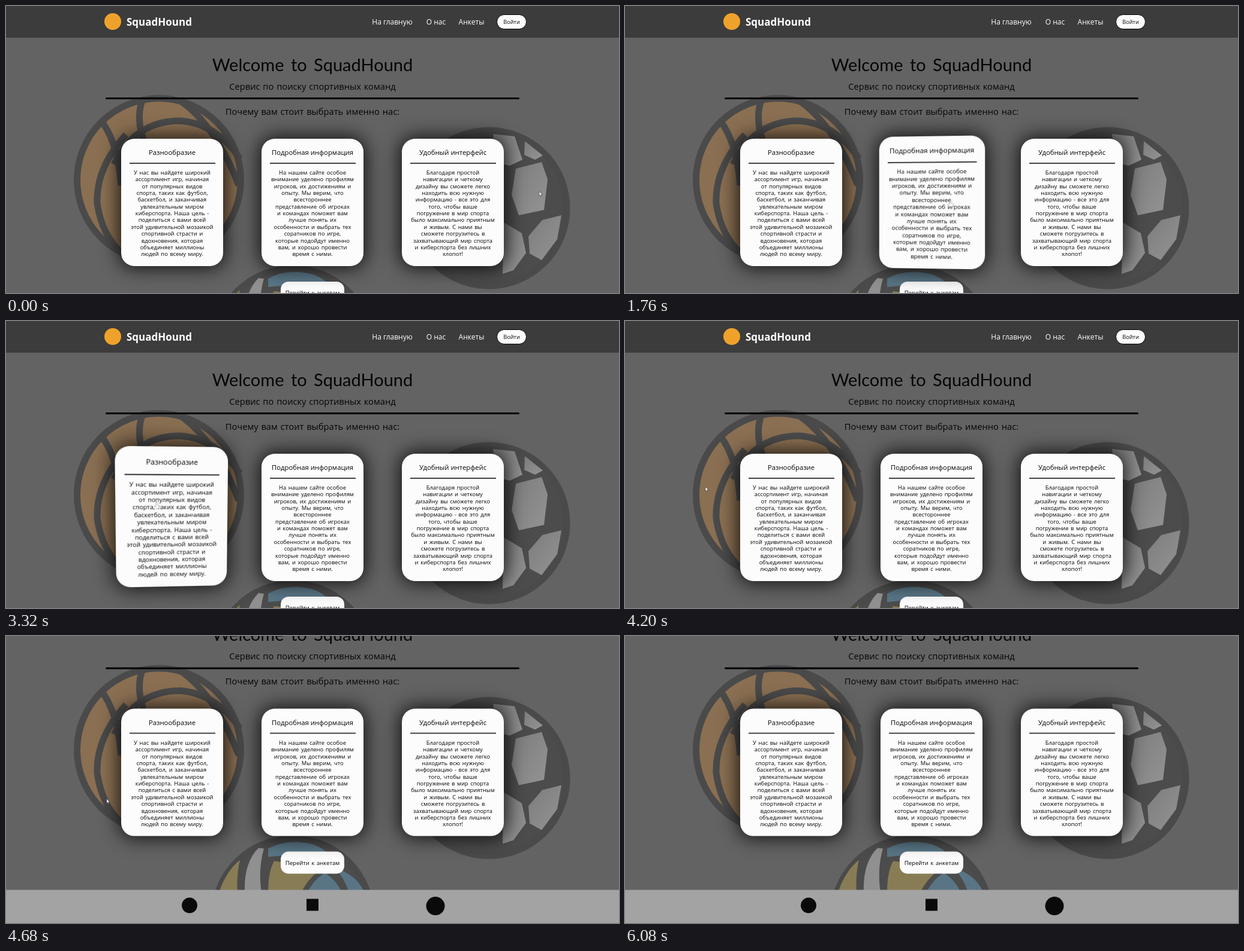
Recreate the animation shown at these times as an HTML page. Size 1022x480 px, loop 7200 ms.

```html
<!DOCTYPE html>
<html lang="ru">
<head>
<meta charset="utf-8">
<title>SquadHound</title>
<style>
html, body { margin: 0; width: 100%; height: 100%; overflow: hidden; background: #636363; }
#stage { position: relative; width: 1022px; height: 480px; overflow: hidden; font-family: "Open Sans", "Noto Sans", sans-serif; color: #050505; }
#page { position: absolute; left: 0; top: 0; width: 1022px; height: 581px; background: #636363; }
#page > * { position: absolute; }
header { left: 0; top: 0; width: 100%; height: 53px; background: #3c3c3c; }
footer { left: 0; top: 525.4px; width: 100%; height: 56px; background: #a3a3a3; }
#balls { left: 0; top: 0; }
.t { position: absolute; transform: translate(-50%, -50%); white-space: nowrap; line-height: 1; }
.nav { color: #fff; font-size: 12px; top: 27px; }
.brand { left: 201px; top: 26px; transform: translateY(-50%); color: #fff; font-size: 17px; font-weight: 700; }
.dot { position: absolute; border-radius: 50%; background: #0a0a0a; transform: translate(-50%, -50%); }
.pill { box-sizing: border-box; background: #fcfcfc; display: flex; align-items: center; justify-content: center; white-space: nowrap; }
.login { left: 818px; top: 14px; width: 50px; height: 25px; border: 1px solid #000; border-radius: 13px; font-size: 9.2px; }
.go { left: 458px; top: 461.4px; width: 106px; height: 37px; border-radius: 13px; font-size: 9.6px; word-spacing: 1px; }
h1 { margin: 0; left: 511px; top: 97px; font: 400 29px/1 Lato, "Open Sans", sans-serif; word-spacing: 4px; }
.lead { left: 511px; font-size: 14.7px; word-spacing: 1px; }
.rule { left: 166px; top: 153px; width: 690px; height: 3px; border-radius: 2px; background: #000; }
.card { top: 221.5px; width: 170px; height: 213px; border-radius: 22px; background: #fcfcfc; box-shadow: 0 0 32px 3px rgba(0,0,0,.85); text-align: center; }
.card b { left: 85px; top: 23px; font-weight: 400; font-size: 11.3px; }
.card i { position: absolute; left: 13.5px; top: 40.5px; width: 143px; height: 2px; background: #444; }
.card p { position: absolute; left: 0; top: 51.3px; width: 100%; margin: 0; font-size: 9.35px; line-height: 11.37px; word-spacing: 1.2px; white-space: pre; }
#cursor { position: absolute; left: 0; top: 0; width: 12px; height: 16px; overflow: visible; }
</style>
</head>
<body>
<div id="stage">
  <div id="page">
    <svg id="balls" width="1022" height="526" fill="none" stroke="#4a4a4a" stroke-width="11">
      <defs>
        <linearGradient id="shine" x1="0" y1="0" x2="1" y2="1">
          <stop offset="0" stop-color="#7c7c7c"/><stop offset="1" stop-color="#929492"/>
        </linearGradient>
        <clipPath id="round"><circle cx="478" cy="570" r="131"/></clipPath>
      </defs>
      <circle cx="255" cy="291" r="136.5" fill="#8a6f52"/>
      <path d="M157 190Q186 225 192 300M228 156Q214 190 235 240M180 265Q215 192 290 192Q350 196 390 255M200 215Q150 270 152 330Q160 385 195 415M290 158Q350 200 388 300"/>
      <circle cx="805" cy="338" r="130" fill="#4c4c4c"/>
      <g fill="url(#shine)" stroke="none">
        <path d="M850 272L893 261L903 290L897 341L855 350L843 316Z"/>
        <path d="M812 214L848 218L861 257L840 267L818 262Z"/>
        <path d="M865 226L895 250L882 257L864 249Z"/>
        <path d="M894 358L926 350L919 390L893 425L873 414L871 385Z"/>
        <path d="M830 362L860 380L867 413L846 442L828 448Z"/>
      </g>
      <circle cx="478" cy="570" r="131" fill="#4c4c4c"/>
      <g clip-path="url(#round)" stroke="none">
        <path fill="#887c55" d="M355 530Q366 495 390 475Q384 500 386 530ZM437 530Q437 495 447 477Q485 480 522 493Q502 508 492 530Z"/>
        <path fill="#909090" d="M398 530Q396 480 421 455L430 456Q420 490 426 530Z"/>
        <path fill="#597585" d="M437 456Q470 438 512 449Q540 460 550 482Q500 462 437 470ZM502 530Q515 505 532 497Q552 510 560 530ZM548 488Q585 500 598 530H572Q566 508 548 488Z"/>
      </g>
    </svg>
    <header>
      <span class="dot" style="left:178px;top:26px;width:28px;height:28px;background:#efa22b"></span>
      <span class="t brand">SquadHound</span>
      <span class="t nav" style="left:644px">На главную</span>
      <span class="t nav" style="left:717px">О нас</span>
      <span class="t nav" style="left:776px">Анкеты</span>
    </header>
    <div class="pill login">Войти</div>
    <h1 class="t">Welcome to SquadHound</h1>
    <div class="t lead" style="top:134px">Сервис по поиску спортивных команд</div>
    <div class="rule"></div>
    <div class="t lead" style="top:176px">Почему вам стоит выбрать именно нас:</div>
    <div class="pill go">Перейти к анкетам</div>
    <footer>
      <span class="dot" style="left:306px;top:26px;width:26px;height:26px"></span>
      <span class="dot" style="left:511px;top:25px;width:20px;height:20px;border-radius:0"></span>
      <span class="dot" style="left:716px;top:27px;width:31px;height:31px"></span>
    </footer>
  </div>
  <svg id="cursor">
    <path id="arrow" d="M0 0V7.5L1.7 6L2.8 8.6L4 8L2.9 5.6H5Z" fill="#fff" stroke="#333" stroke-width=".6"/>
    <path id="hand" d="M0 .5Q1-.5 2 .5V4.5L5.5 5.2Q6.5 5.6 6.3 7L5.6 11H.5L-2.8 7.2Q-2.8 5.6-1.4 6.2L0 7.2Z" fill="#fff" stroke="#888" stroke-width=".7" opacity=".8"/>
  </svg>
</div>
<script>
const LOOP = 7200, LAG = 200, SAMPLES = 10;
const MAX_TILT = 15, GROW = .1, SCROLL = 100.4;
const CARD = { y: 221.5, w: 170, h: 213 };
const $ = id => document.getElementById(id);

const texts = [
  ['Разнообразие', `У нас вы найдете широкий
ассортимент игр, начиная
от популярных видов
спорта, таких как футбол,
баскетбол, и заканчивая
увлекательным миром
киберспорта. Наша цель -
поделиться с вами всей
этой удивительной мозаикой
спортивной страсти и
вдохновения, которая
объединяет миллионы
людей по всему миру.`],
  ['Подробная информация', `На нашем сайте особое
внимание уделено профилям
игроков, их достижениям и
опыту. Мы верим, что
всестороннее
представление об игроках
и командах поможет вам
лучше понять их
особенности и выбрать тех
соратников по игре,
которые подойдут именно
вам, и хорошо провести
время с ними.`],
  ['Удобный интерфейс', `Благодаря простой
навигации и четкому
дизайну вы сможете легко
находить всю нужную
информацию - все это для
того, чтобы ваше
погружение в мир спорта
было максимально приятным
и живым. С нами вы
сможете погрузитесь в
захватывающий мир спорта
и киберспорта без лишних
хлопот!`]
];

const cards = texts.map(([title, text], i) => {
  const el = document.createElement('div'), x = 192 + 234 * i;
  el.className = 'card';
  el.style.left = x + 'px';
  el.innerHTML = `<b class="t">${title}</b><i></i><p>${text}</p>`;
  $('page').append(el);
  return { el, x };
});

// stops of the pointer: time, x, y
const stops = [
  [0, 889, 310], [1120, 697, 301], [1560, 650, 330], [2160, 230, 310], [2440, 344, 294],
  [3320, 250, 303], [4000, 134, 277], [4640, 134, 277], [4900, 665, 200], [5120, 732, 265],
  [5240, 790, 350], [5520, 569, 486], [5800, 631, 486], [5940, 800, 436], [6080, 972, 486]
];

const ease = (t, from, to) => {
  const u = Math.min(1, Math.max(0, (t - from) / (to - from)));
  return u * u * (3 - 2 * u);
};

const scrollAt = t => SCROLL * ease(t, 4205, 4640);

function pointerAt(t) {
  const i = stops.findIndex(s => s[0] > t);
  if (i < 0) return stops[stops.length - 1].slice(1);
  if (i === 0) return stops[0].slice(1);
  const [t0, x0, y0] = stops[i - 1], [t1, x1, y1] = stops[i];
  const u = ease(t, t0, t1);
  return [x0 + (x1 - x0) * u, y0 + (y1 - y0) * u];
}

// pointer offset from the card centre, -1 to 1, or null when outside
function hover(card, t) {
  const [px, py] = pointerAt(t);
  const u = (px - card.x) / CARD.w * 2 - 1;
  const v = (py + scrollAt(t) - CARD.y) / CARD.h * 2 - 1;
  return Math.abs(u) < 1 && Math.abs(v) < 1 ? [u, v] : null;
}

// the card follows the pointer as an average over the last moments
function pose(card, t) {
  let rx = 0, ry = 0, grow = 0;
  for (let k = 0; k < SAMPLES; k++) {
    const h = hover(card, t - LAG * k / SAMPLES);
    if (!h) continue;
    rx += h[1] * MAX_TILT / SAMPLES;
    ry -= h[0] * MAX_TILT / SAMPLES;
    grow += GROW / SAMPLES;
  }
  if (!grow) return 'none';
  return `perspective(532px) rotateX(${rx}deg) rotateY(${ry}deg) scale(${1 + grow})`;
}

function draw(t) {
  const [x, y] = pointerAt(t);
  const over = cards.some(card => hover(card, t));
  for (const card of cards) card.el.style.transform = pose(card, t);
  $('page').style.transform = `translateY(${-scrollAt(t)}px)`;
  $('cursor').style.transform = `translate(${x}px,${y}px)`;
  $('arrow').style.display = over ? 'none' : '';
  $('hand').style.display = over ? '' : 'none';
}

let start;
function tick(now) {
  start ??= now;
  draw((now - start) % LOOP);
  requestAnimationFrame(tick);
}
draw(0);
requestAnimationFrame(tick);
</script>
</body>
</html>
```
